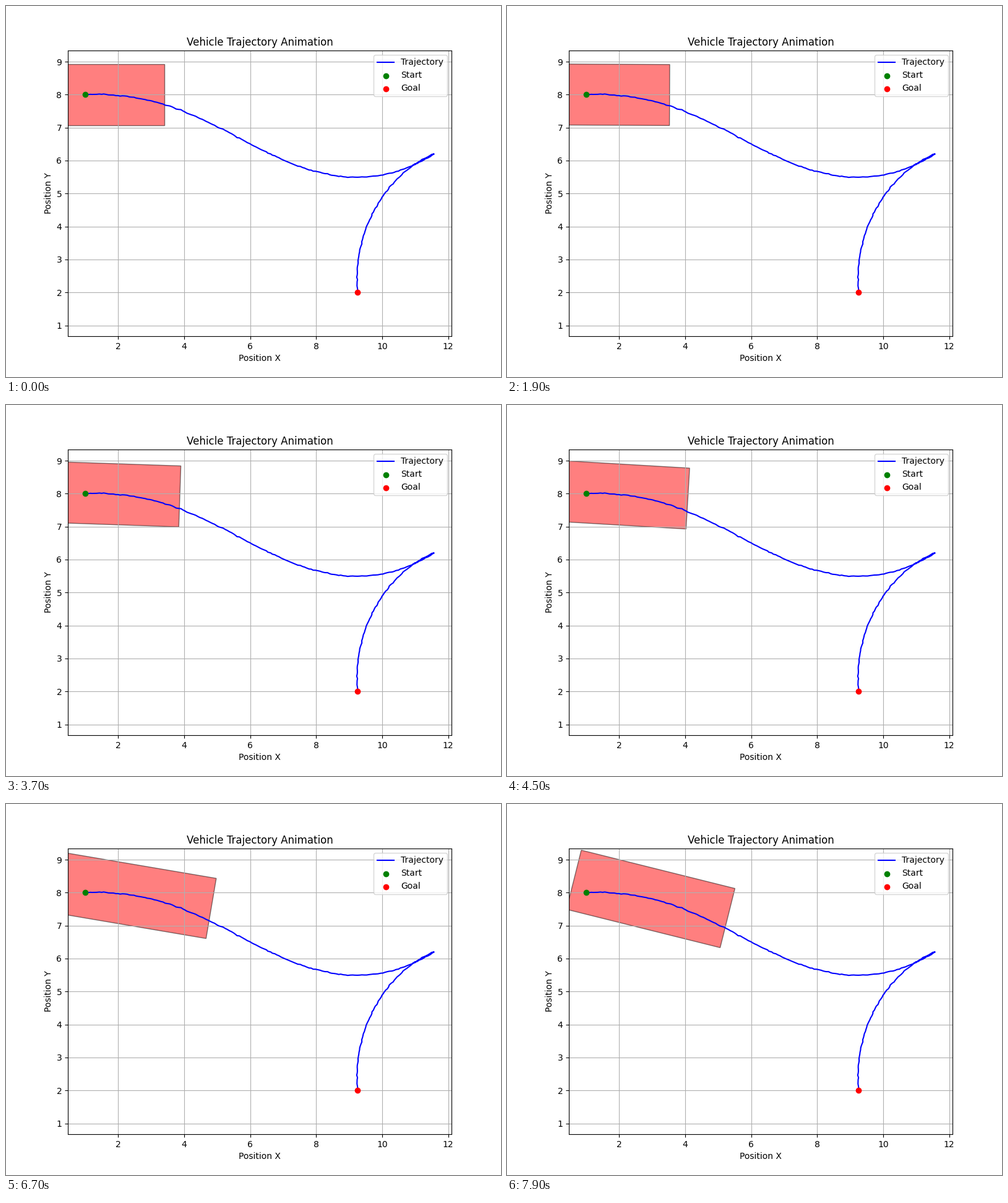
Animation of 800x600 px, one loop 8000 ms. Source, as a matplotlib script:

```python
import numpy as np
import matplotlib.pyplot as plt
from matplotlib.animation import FuncAnimation
from matplotlib.patches import Polygon

FRAMES, INTERVAL = 80, 100
LENGTH, WIDTH = 4.8, 1.85
START, CUSP, GOAL = (1.0, 8.0), (11.565, 6.206), (9.25, 2.0)
SCALE = 53.32            # pixels per unit
LEFT, TOP = 0.4715, 9.338

FORWARD = [START, (2.27, 7.945), (3.55, 7.65), (5.05, 7.0), (6.34, 6.33),
           (7.52, 5.81), (9.0, 5.5), (10.19, 5.605), CUSP]
REVERSE = [CUSP, (10.75, 5.71), (10.0, 4.89), (9.53, 3.99), (9.33, 3.3), GOAL]


def smooth(keys, count):
    """Cubic Hermite curve through the key points."""
    p = np.array(keys)
    t = np.concatenate([[0], np.cumsum(np.hypot(*np.diff(p, axis=0).T))])
    m = np.gradient(p, t, axis=0, edge_order=2)
    s = np.linspace(0, t[-1], count)
    i = np.clip(np.searchsorted(t, s, side="right") - 1, 0, len(t) - 2)
    h = (t[i + 1] - t[i])[:, None]
    u = (s - t[i])[:, None] / h
    return ((1 + 2 * u) * (1 - u)**2 * p[i] + u * (1 - u)**2 * h * m[i]
            + u**2 * (3 - 2 * u) * p[i + 1] + u**2 * (u - 1) * h * m[i + 1])


def noisy_path():
    rng = np.random.default_rng(4)
    path = np.vstack([smooth(FORWARD, 160), smooth(REVERSE, 80)])
    path[1:-1] += rng.normal(0, 0.007, (len(path) - 2, 2))
    return path


def pose(n):
    """Vehicle centre and heading: speeding up while turning right."""
    d = n**2 * (0.01855 - 3e-7 * n**2) / SCALE
    turn = n**3 * (4.12e-5 - 2.05e-9 * n**2)
    return START[0] + d, START[1] - 0.0256 * d**3, -np.radians(turn)


def corners(n):
    x, y, a = pose(n)
    box = np.array([(-1, -1), (1, -1), (1, 1), (-1, 1)]) * (LENGTH / 2, WIDTH / 2)
    c, s = np.cos(a), np.sin(a)
    return box @ np.array([(c, s), (-s, c)]) + (x, y)


fig, ax = plt.subplots(figsize=(8, 6), dpi=100)
ax.plot(*noisy_path().T, "b-", label="Trajectory")
ax.scatter(*START, color="green", label="Start", zorder=5)
ax.scatter(*GOAL, color="red", label="Goal", zorder=5)
vehicle = ax.add_patch(Polygon(corners(0), closed=True, facecolor="red",
                               edgecolor="black", alpha=0.5))

ax.set_xlim(LEFT, LEFT + 620 / SCALE)
ax.set_ylim(TOP - 462 / SCALE, TOP)
ax.set_xlabel("Position X")
ax.set_ylabel("Position Y")
ax.set_title("Vehicle Trajectory Animation")
ax.legend(loc="upper right")
ax.grid(True)


def update(n):
    vehicle.set_xy(corners(n))
    return (vehicle,)


anim = FuncAnimation(fig, update, frames=FRAMES, interval=INTERVAL,
                     repeat=True, repeat_delay=0)
plt.show()
```
